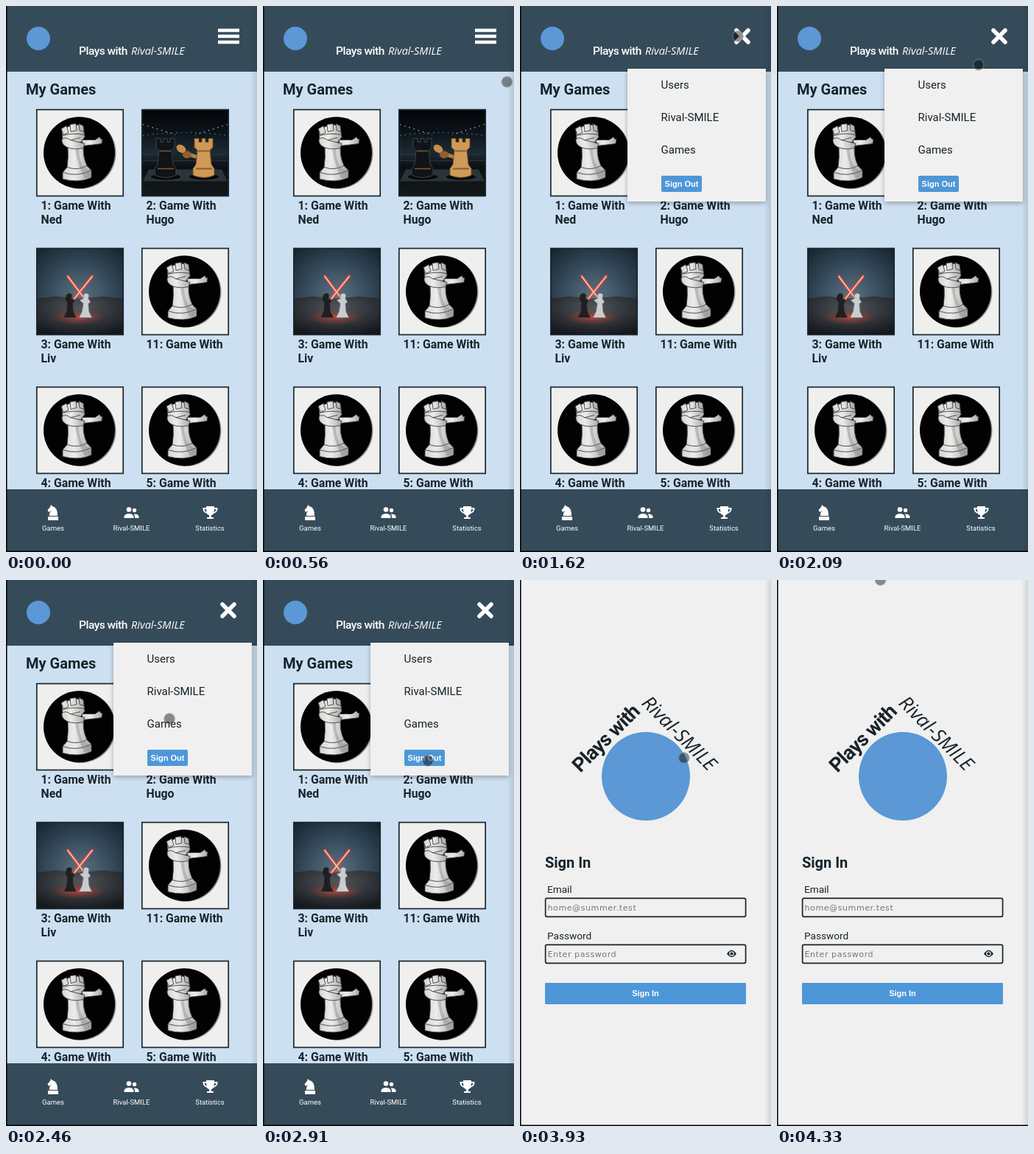
An HTML page that plays this animation: 341 px wide and 740 px high, repeating every 5.36 s.

```html
<!DOCTYPE html>
<html lang="en">
<head>
<meta charset="utf-8">
<title>Chess games: menu and sign out</title>
<style>
  html, body { margin: 0; width: 100%; height: 100%; overflow: hidden; background: #efefef; }
  svg.stage { display: block; width: 100%; height: 100%; }
  text { font-family: Roboto, sans-serif; fill: #17232b; }
  .bold { font-weight: 700; }
  .caption { font-size: 15.8px; font-weight: 700; }
  .menu-item { font-size: 15px; }
  .label { font-size: 13.6px; }
  .hint { font: 11px "DejaVu Sans", sans-serif; letter-spacing: .6px; fill: #757575; }
  .button { font: bold 11px "Liberation Sans", Arial, sans-serif; fill: #fff; text-anchor: middle; }
  .tab { font-size: 9.5px; fill: #fff; text-anchor: middle; }
  .script { font-family: "Open Sans", sans-serif; font-style: italic; }
  .white { fill: #fff; }

  .games, .closed, .opened, .signin { animation: 5360ms step-end infinite; }
  .games { animation-name: games; }
  .closed { animation-name: closed; }
  .opened { animation-name: opened; visibility: hidden; }
  .signin { animation-name: signin; visibility: hidden; }
  /* The menu opens at 1620 ms, the sign-in page appears at 3060 ms. */
  @keyframes games { 0% { visibility: visible } 57.09%, 100% { visibility: hidden } }
  @keyframes closed { 0% { visibility: visible } 30.22%, 100% { visibility: hidden } }
  @keyframes opened { 0% { visibility: hidden } 30.22% { visibility: visible } 57.09%, 100% { visibility: hidden } }
  @keyframes signin { 0% { visibility: hidden } 57.09%, 100% { visibility: visible } }

  .pointer { animation: travel 5360ms linear infinite; }
  @keyframes travel {
    0%, 9.87% { transform: translate(356px, 132px); }
    9.89% { transform: translate(338px, 112px); animation-timing-function: ease-out; }
    15.49% { transform: translate(298px, 56px); animation-timing-function: ease-out; }
    19.22%, 36.1% { transform: translate(296px, 41px); }
    38.99% { transform: translate(274px, 79px); animation-timing-function: ease-out; }
    45.9%, 47.4% { transform: translate(222px, 188px); animation-timing-function: ease-out; }
    54.29%, 72.6% { transform: translate(224px, 245px); animation-timing-function: ease-in-out; }
    80.78%, 100% { transform: translate(140.5px, 0); }
  }
</style>
</head>
<body>
<svg class="stage" viewBox="0 0 341 740" preserveAspectRatio="none">
  <defs>
    <linearGradient id="edge"><stop offset="0" stop-opacity="0"/><stop offset="1" stop-opacity=".12"/></linearGradient>
    <linearGradient id="stone"><stop offset="0" stop-color="#d4d4d2"/><stop offset=".4" stop-color="#ececea"/><stop offset="1" stop-color="#a9a9a7"/></linearGradient>
    <linearGradient id="arena" x2="0" y2="1">
      <stop offset="0" stop-color="#030507"/><stop offset=".25" stop-color="#0b1319"/>
      <stop offset=".5" stop-color="#1d2b35"/><stop offset=".66" stop-color="#0b1014"/><stop offset="1" stop-color="#14191c"/>
    </linearGradient>
    <radialGradient id="dusk" cx=".5" cy=".55" r=".75">
      <stop offset="0" stop-color="#5c7280"/><stop offset=".5" stop-color="#34495a"/><stop offset="1" stop-color="#14202a"/>
    </radialGradient>
    <radialGradient id="soil" cx=".5" cy=".3" r=".75">
      <stop offset="0" stop-color="#51565a"/><stop offset="1" stop-color="#14181c"/>
    </radialGradient>
    <radialGradient id="ember"><stop offset="0" stop-color="#d9483b" stop-opacity=".8"/><stop offset="1" stop-color="#a92f28" stop-opacity="0"/></radialGradient>
    <filter id="shade" x="-10%" y="-10%" width="120%" height="125%"><feDropShadow dx="0" dy="2" stdDeviation="3" flood-opacity=".3"/></filter>

    <path id="rook" d="M2 0h6v5h4V0h5v5h4V0h6v12l-4 4 2 19 4 6v9q-14 6-29 0v-9l4-6 2-19-4-4z"/>
    <rect id="frame" x=".8" y="1" width="117.400" height="117" fill="none" stroke="#17252d" stroke-width="1.700"/>

    <g id="dab">
      <rect y=".5" width="119" height="118" fill="#efefee"/>
      <circle cx="60" cy="60" r="48.500" fill="#8f8f8f"/>
      <circle cx="58.500" cy="59.300" r="48.500" fill="#020202"/>
      <g fill="url(#stone)" stroke="#3f3f3f" stroke-width=".9" stroke-linejoin="round">
        <path d="M43 52 65 47Q62 62 69 77L75 83V93Q58 101 36 95V86L42 79Q44 66 43 52z"/>
        <path d="M36 86Q56 93 75 83M42 79Q56 84 69 77" fill="none"/>
        <path d="M35 30Q47 18 64 23L66 38 61 45 41 50 36 42z"/>
        <path d="M34 27 41 23 44 32 37 35zM46 21 54 20 55 29 47 31zM58 20 64 23 65 31 59 29z"/>
        <path d="M36 36Q50 32 66 35M40 44 60 39" fill="none"/>
        <path d="M62 42 80 42 86 38 88 41 90 41 89 47 82 48 64 50z"/>
        <path d="M35 41Q40 37 46 42L66 47 64 53Q52 56 42 52 34 48 35 41z"/>
      </g>
      <path d="M58 54Q58 72 66 80L73 86V92L66 95Q57 78 53 55z" fill="#777" opacity=".35"/>
      <use href="#frame"/>
    </g>

    <g id="boxing">
      <rect y=".5" width="119" height="118" fill="url(#arena)"/>
      <g fill="none" stroke="#9db4c2" stroke-width="1.200" stroke-dasharray="1.500 5">
        <path d="M2 21 46 35M117 21 73 35"/>
        <path d="M2 36Q60 28 117 36" opacity=".6"/>
      </g>
      <path d="M2 62H117M2 70H117" stroke="#27343d"/>
      <path d="M10 82H109L117 98H2z" fill="#2c3439"/>
      <ellipse cx="33" cy="92" rx="20" ry="4" fill="#07090b"/>
      <ellipse cx="85" cy="92" rx="20" ry="4" fill="#07090b"/>
      <use href="#rook" x="18" y="40" fill="#101417" stroke="#3c454b"/>
      <path d="M25 57h15M22 81h22" stroke="#7d5a35" stroke-width="1.500"/>
      <use href="#rook" x="70" y="40" fill="#cf9a58" stroke="#6f4822"/>
      <path d="M77 57h15M74 81h22" stroke="#8d5d2c" stroke-width="2"/>
      <path d="M75 65 60 60" stroke="#b57d40" stroke-width="5"/>
      <path d="M42 63 53 61" stroke="#1d2225" stroke-width="5"/>
      <ellipse cx="54" cy="54" rx="7" ry="5" transform="rotate(35 54 54)" fill="#c88e4c"/>
      <ellipse cx="62" cy="62" rx="6" ry="5" fill="#8f5f2f"/>
      <use href="#frame"/>
    </g>

    <g id="duel">
      <rect y=".5" width="119" height="118" fill="url(#dusk)"/>
      <path d="M1 69 26 66 58 69 91 66 118 69V118H1z" fill="url(#soil)"/>
      <ellipse cx="57" cy="94" rx="38" ry="11" fill="url(#ember)"/>
      <g stroke-linecap="round">
        <path d="M43 39 64 67M76 39 52 69" stroke="#e8463a" stroke-width="4.500" opacity=".75"/>
        <path d="M43 39 64 67M76 39 52 69" stroke="#ffc2ac" stroke-width="1.600"/>
      </g>
      <path d="M41 64q4-5 8 0l-1 5 5 3-3 4 1 11 4 8H37l4-8 1-12-3-5z" fill="#1c2023" stroke="#5f4440" stroke-width=".8"/>
      <path d="M64 64q4-5 8 0l-1 5 3 5-3 2 1 11 4 8H58l4-8 2-11-5-5 5-2z" fill="#c9cdd0" stroke="#66696b" stroke-width=".8"/>
      <use href="#frame"/>
    </g>
  </defs>

  <g class="games">
    <rect width="341" height="740" fill="#cde0f1"/>
    <text class="bold" x="27" y="120" font-size="20">My Games</text>
    <use href="#dab" x="41" y="139.500"/>
    <use href="#boxing" x="184" y="139.500"/>
    <use href="#duel" x="41" y="327.500"/>
    <use href="#dab" x="184" y="327.500"/>
    <use href="#dab" x="41" y="515.500"/>
    <use href="#dab" x="184" y="515.500"/>
    <g class="caption">
      <text x="47.500" y="276.300">1: Game With<tspan x="47.500" dy="19">Ned</tspan></text>
      <text x="190.500" y="276.300">2: Game With<tspan x="190.500" dy="19">Hugo</tspan></text>
      <text x="47.500" y="464.300">3: Game With<tspan x="47.500" dy="19">Liv</tspan></text>
      <text x="190.500" y="464.300">11: Game With</text>
      <text x="47.500" y="652.300">4: Game With</text>
      <text x="190.500" y="652.300">5: Game With</text>
    </g>

    <rect width="341" height="89" fill="#364b5a"/>
    <circle cx="44" cy="44" r="16" fill="#5b98d5"/>
    <text class="white" x="99" y="66" font-size="15.500" font-weight="500" letter-spacing="-.5">Plays with</text>
    <text class="white script" x="170" y="66" font-size="14.500">Rival-SMILE</text>

    <rect y="655" width="341" height="85" fill="#364b5a"/>
    <g fill="#fff">
      <path d="M59 691Q58 687 62 684L58 686 56.500 683 60 679 61 676 63 678Q70 679 70 691zM57 692H71V697H57z"/>
      <circle cx="167" cy="682.500" r="3.300"/>
      <circle cx="174.500" cy="683.500" r="2.700"/>
      <path d="M160.500 694V691.500Q162 688 167 688T173.500 691.500V694zM175 694V691.500Q175 690 173.500 688.500 179 688 180.500 691.500V694z"/>
      <path d="M272 678H283V680H287.500Q288 686 282 688 280.500 690 279 690V693H282V695H273V693H276V690Q274 690 273 688 267 686 267.500 680H272zM272 682H269.500Q270 685 272.500 686zM283 682 282.500 686Q285 685 285.500 682z"/>
    </g>
    <text class="tab" x="64" y="711">Games</text>
    <text class="tab" x="170.500" y="711">Rival-SMILE</text>
    <text class="tab" x="277" y="711">Statistics</text>
  </g>

  <path class="closed" d="M288 33H317M288 41H317M288 49H317" stroke="#fff" stroke-width="4.500"/>

  <g class="opened">
    <path d="M294 33 310 49M310 33 294 49" stroke="#fff" stroke-width="5.500" stroke-linecap="round"/>
    <rect x="146" y="85" width="188" height="180" fill="#f0f0f0" filter="url(#shade)"/>
    <text class="menu-item" x="191.500" y="112">Users</text>
    <text class="menu-item" x="191.500" y="156">Rival-SMILE</text>
    <text class="menu-item" x="191.500" y="200">Games</text>
    <rect x="192" y="230" width="55" height="22" rx="2" fill="#4d97d9"/>
    <text class="button" x="219.500" y="245">Sign Out</text>
  </g>

  <g class="signin">
    <rect width="341" height="740" fill="#f0f0f0"/>
    <circle cx="171" cy="266" r="60" fill="#5b98d5"/>
    <text class="bold" transform="translate(82 262) rotate(-45)" font-size="27" letter-spacing="-.8">Plays with</text>
    <text class="script" transform="translate(164 168) rotate(45)" font-size="26">Rival-SMILE</text>

    <text class="bold" x="34" y="390" font-size="20">Sign In</text>
    <text class="label" x="37" y="424">Email</text>
    <text class="label" x="37" y="487">Password</text>
    <g fill="none" stroke="#17232b" stroke-width="1.700">
      <rect x="34.600" y="431.300" width="272" height="25" rx="2"/>
      <rect x="34.600" y="494.300" width="272" height="25" rx="2"/>
    </g>
    <text class="hint" x="37.500" y="447.500">home@summer.test</text>
    <text class="hint" x="37.500" y="510.500">Enter password</text>
    <path d="M281 506.500Q287.500 497 294 506.500 287.500 516 281 506.500z" fill="#17232b"/>
    <circle cx="287.500" cy="506.500" r="2.700" fill="#17232b" stroke="#f0f0f0" stroke-width="1.200"/>
    <rect x="34" y="546" width="273" height="29" rx="1" fill="#4d97d9"/>
    <text class="button" x="170.500" y="564">Sign In</text>
  </g>

  <rect x="332" width="9" height="740" fill="url(#edge)"/>
  <path d="M0 0H1.500V738.500H341V740H0z"/>
  <g class="pointer">
    <circle r="7" fill="#000" fill-opacity=".43"/>
    <circle r="7.200" fill="none" stroke="#8a8a8a" stroke-opacity=".8"/>
  </g>
</svg>
</body>
</html>
```
